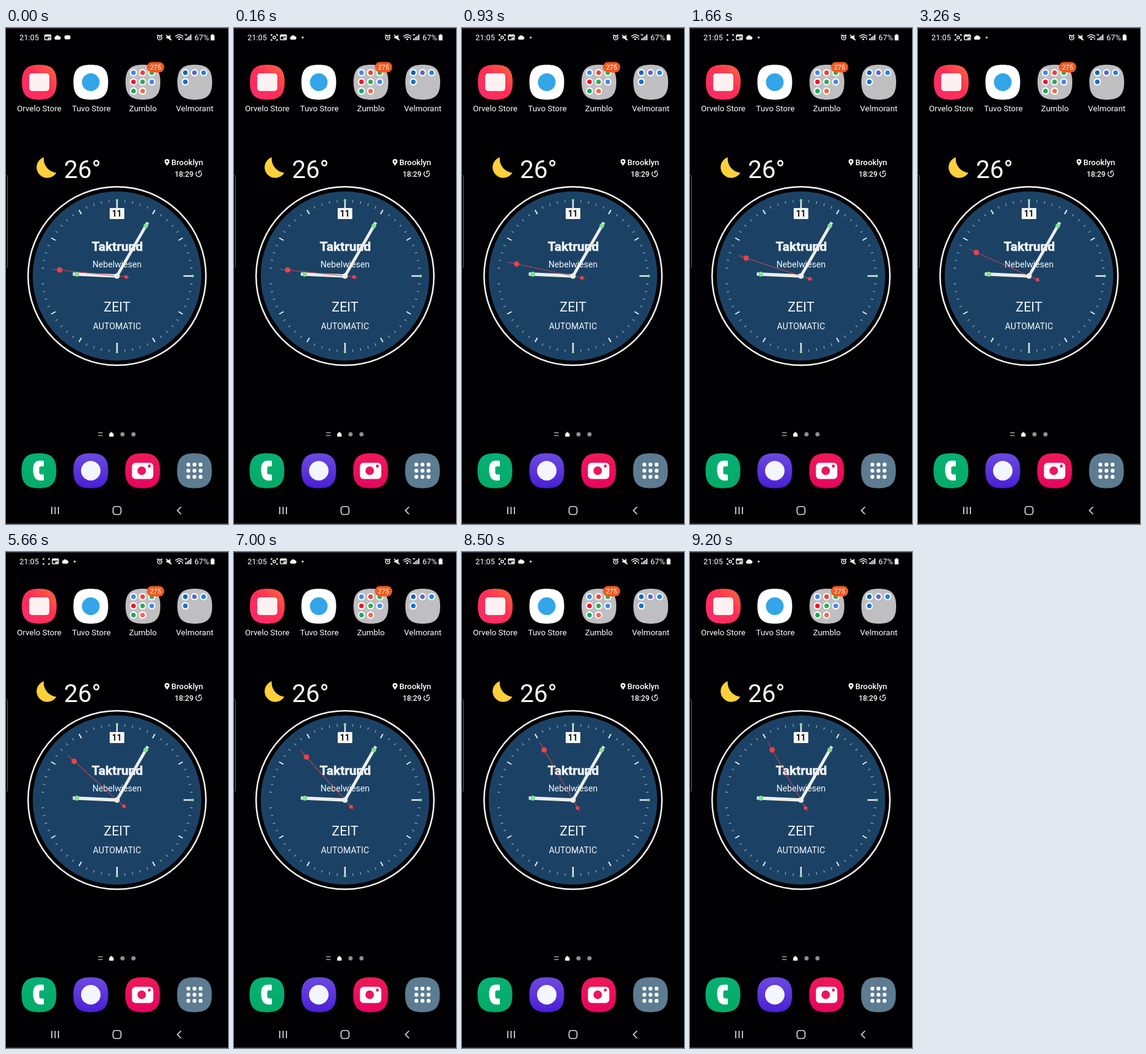
Animation of 364 by 810 pixels, one loop 9.23 s. Source, as an HTML page:

```html
<!DOCTYPE html>
<html lang="en">
<head>
<meta charset="utf-8">
<title>Clock home screen</title>
<style>
  html, body { margin: 0; width: 100%; height: 100%; overflow: hidden; background: #010103; }
  svg { display: block; width: 364px; height: 810px; font-family: Roboto, "Noto Sans", sans-serif; fill: #fff; }
  .mid { text-anchor: middle; }
  .label { font-size: 13.4px; text-anchor: middle; }
  .line { fill: none; stroke: #fff; stroke-width: 1.4; }
  .nav { fill: none; stroke: #dedede; stroke-width: 1.7; }
  .round { stroke-linecap: round; stroke-linejoin: round; }
</style>
</head>
<body>
<svg viewBox="0 0 364 810">
  <defs>
    <path id="tile" d="M28.5 0C49 0 57 8 57 28.5S49 57 28.5 57 0 49 0 28.5 8 0 28.5 0Z"/>
    <linearGradient id="shop" y1="1" x2="1" y2="0"><stop stop-color="#fb2a6c"/><stop offset=".55" stop-color="#ff2f55"/><stop offset="1" stop-color="#ff6a3c"/></linearGradient>
    <linearGradient id="web" x2="0" y2="1"><stop stop-color="#6c4ae0"/><stop offset="1" stop-color="#4a1fd6"/></linearGradient>
    <linearGradient id="call" x2="0" y2="1"><stop stop-color="#08b074"/><stop offset="1" stop-color="#02ab68"/></linearGradient>
    <linearGradient id="cam" x2="0" y2="1"><stop stop-color="#f01a58"/><stop offset="1" stop-color="#e5045f"/></linearGradient>
  </defs>
  <rect width="364" height="810" fill="#010103"/>
  <path d="M0 .5H364M0 809.5H364" stroke="#3c3c3e"/>
  <path d="M-2 240Q2.5 240 2.5 244V388Q2.5 392 -2 392" fill="#010103" stroke="#6a6a6c"/>

  <!-- status bar -->
  <text x="22" y="20" font-size="12.8">21:05</text>
  <g id="rec" class="line">
    <path d="M61 13V11H63M69 11H71V13M71 18V20H69M63 20H61V18"/>
    <rect id="core" x="64" y="13.5" width="4" height="4" rx="1"/>
  </g>
  <g id="icons">
    <rect x="76" y="11.2" width="10" height="8" rx="1" class="line"/>
    <path d="M76 12H86V14H76ZM81 15.5H85V18H81Z"/>
    <path d="M93.5 19A2.7 2.7 0 0 1 93.5 14 3.8 3.8 0 0 1 100 13.6 2.8 2.8 0 0 1 100.500 19Z"/>
  </g>
  <rect id="pill" x="96" y="12" width="9.5" height="6.5" rx="2"/>
  <circle id="more" cx="112.5" cy="15.5" r="1.6"/>

  <g class="line">
    <circle cx="252" cy="15.8" r="3.6"/>
    <path d="M247.5 12.5L249.5 11M256.5 12.5L254.5 11M252 13.8V16H253.5"/>
    <path d="M262.5 11L271.5 20"/>
    <path d="M278 13.5Q284 8.5 290 13.5M280 16Q284 12.5 288 16" class="round"/>
  </g>
  <path d="M263 14H265.5L269.5 11V20L265.5 17H263Z"/>
  <circle cx="284" cy="18.3" r="1.5"/>
  <path d="M288 17L289.5 15.5 291 17ZM288 18H291L289.5 19.5Z"/>
  <path d="M294 20V17H295.8V20ZM296.7 20V15H298.5V20ZM299.4 20V13H301.2V20ZM302.1 20V10.5H303.9V20ZM293 10.5H297V12H293Z"/>
  <text x="309" y="20" font-size="12.8">67%</text>
  <path d="M337.2 10.3H340.2V11.5H341.8V20.3H335.6V11.5H337.2Z"/>

  <!-- top row -->
  <use href="#tile" x="26" y="60" fill="url(#shop)"/>
  <rect x="38" y="74" width="33" height="29" rx="5" fill="#fff0f2"/>
  <use href="#tile" x="110.5" y="60"/>
  <circle cx="139" cy="88.5" r="14.5" fill="#34a5e8"/>
  <use href="#tile" x="196" y="60" fill="#bfbfc1"/>
  <use href="#tile" x="281" y="60" fill="#bfbfc1"/>
  <g id="minis"></g>
  <rect x="231" y="55.5" width="28.5" height="17" rx="8.5" fill="#f3581d"/>
  <text class="mid" x="245.2" y="68" font-size="11">275</text>
  <text class="label" x="54.5" y="136">Orvelo Store</text>
  <text class="label" x="140" y="136">Tuvo Store</text>
  <text class="label" x="224.5" y="136">Zumblo</text>
  <text class="label" x="309.5" y="136">Velmorant</text>

  <!-- weather -->
  <path d="M62 211A17.4 17.4 0 1 0 82.5 236.5A23 23 0 0 1 62 211Z" fill="#fdd03c"/>
  <text x="95" y="244.5" font-size="40.5">26°</text>
  <path fill-rule="evenodd" d="M264 225C261 221 260 219.5 260 218A4 4 0 0 1 268 218C268 219.5 267 221 264 225ZM264 216.5A1.5 1.5 0 1 0 264 219.5 1.5 1.5 0 1 0 264 216.5Z"/>
  <text x="271" y="224" font-size="13.3" font-weight="500">Brooklyn</text>
  <text x="276.5" y="243" font-size="12.2" font-weight="500">18:29</text>
  <path class="line" d="M313 234.8A4.5 4.5 0 1 0 319.8 236M316 233.8H320.5M316.3 233.5V238"/>

  <!-- watch face -->
  <circle cx="182" cy="405" r="145.8" fill="#010103" stroke="#f6f6f6" stroke-width="2.5"/>
  <circle cx="182" cy="405" r="138.2" fill="#1b4265"/>
  <g id="ticks" stroke="#e9eef2"></g>
  <g id="studs" fill="#7fdc92"></g>
  <rect x="170" y="294" width="24" height="18" rx="1" fill="#f6f8f6"/>
  <text class="mid" x="181.8" y="308" font-size="14" font-weight="700" fill="#111">11</text>
  <g class="mid" fill="#f4f7fa">
    <text x="182.5" y="364" font-size="21" font-weight="700" stroke="#f4f7fa" stroke-width=".5">Taktrund</text>
    <text x="182" y="390.5" font-size="14.1">Nebelwiesen</text>
    <text x="182" y="463" font-size="21.5">ZEIT</text>
    <text x="182" y="492" font-size="14.2">AUTOMATIC</text>
  </g>
  <g transform="translate(182 405)">
    <g transform="rotate(272.5)">
      <path d="M0 0V-72.5" stroke="#eceeec" stroke-width="5.5"/>
      <circle cy="-66" r="4" fill="#86dc95"/>
    </g>
    <g transform="rotate(30)">
      <path d="M0 0V-101" stroke="#eceeec" stroke-width="4.8"/>
      <circle cy="-94.5" r="3.8" fill="#86dc95"/>
    </g>
    <g id="second" fill="#ea424c">
      <path d="M0 21V-108.5" stroke="#d8434f"/>
      <circle cy="-94.5" r="4.5"/>
      <circle cy="15" r="3"/>
    </g>
    <circle r="4.5" fill="#eceeec"/>
  </g>

  <!-- page marks -->
  <path d="M151 661H158.5M151 665.5H158.5" stroke="#a5a5a7" stroke-width="1.6"/>
  <path d="M172.8 660L176 663V667H169.6V663Z" class="round" stroke="#fff" stroke-width=".8"/>
  <circle cx="191" cy="663.5" r="3.5" fill="#8d8d8f"/>
  <circle cx="209" cy="663.5" r="3.5" fill="#8d8d8f"/>

  <!-- dock -->
  <use href="#tile" x="25.5" y="694.5" fill="url(#call)"/>
  <path d="M56 706.5H60.5Q62 706.5 62 708V714.500Q62 716 60.500 716H57Q54.500 716 54.500 718.500V726Q54.500 729 57.500 729H60.500Q62 729 62 730.500V737.500Q62 739 60.500 739H57C48 739 44.500 732 44.500 721C44.500 711 48 706.500 56 706.500Z"/>
  <use href="#tile" x="110.5" y="694.5" fill="url(#web)"/>
  <circle cx="139" cy="723" r="16" fill="#f4f6ff"/>
  <use href="#tile" x="195.5" y="694.5" fill="url(#cam)"/>
  <rect x="206.500" y="710" width="35" height="26.5" rx="6"/>
  <circle cx="222.5" cy="723" r="7" fill="#e9175e"/>
  <circle cx="235" cy="715.5" r="2.4" fill="#e9175e"/>
  <use href="#tile" x="280.5" y="694.5" fill="#5d7b91"/>
  <g id="grid"></g>

  <!-- navigation -->
  <g class="nav">
    <path d="M75 782V794M80.5 782V794M86 782V794"/>
    <rect x="175.500" y="781.500" width="13" height="13" rx="4"/>
    <path d="M287 782L281 788 287 794"/>
  </g>
</svg>
<script>
const LOOP = 9230;
const el = id => document.getElementById(id);
const set = (id, name, value) => el(id).setAttribute(name, value);

function add(parent, tag, attrs) {
  const node = document.createElementNS("http://www.w3.org/2000/svg", tag);
  for (const key in attrs) node.setAttribute(key, attrs[key]);
  el(parent).appendChild(node);
}
const dot = (parent, cx, cy, r, fill) => add(parent, "circle", { cx, cy, r, ...(fill && { fill }) });

for (let i = 0; i < 60; i++) {
  if (i === 45) continue;
  const quarter = i % 15 === 0, hour = i % 5 === 0;
  const inner = quarter ? 109 : hour ? 116.5 : 120.5;
  add("ticks", "path", {
    d: `M182 ${405 - inner}V${405 - 124.5}`,
    transform: `rotate(${i * 6} 182 405)`,
    "stroke-width": quarter ? 2.4 : hour ? 2 : 1,
    opacity: hour ? 1 : 0.75
  });
}
[[182, 281.5], [306, 405], [182, 529]].forEach(([x, y]) => dot("studs", x, y, 2.2));

function fillFolder(x, colors) {
  colors.forEach((color, i) => {
    const cx = x + i % 3 * 15, cy = 73 + Math.floor(i / 3) * 15;
    dot("minis", cx, cy, 6, "#fff");
    dot("minis", cx, cy, 3.8, color);
  });
}
fillFolder(209, ["#4285f4", "#ea4335", "#34a853", "#f0142a", "#34a853", "#4285f4", "#18a85a", "#ee6a4d"]);
fillFolder(294, ["#0a66c2", "#5a63d8", "#1a82dc", "#0f72ce"]);

for (let i = 0; i < 9; i++) dot("grid", 299 + i % 3 * 10, 713 + Math.floor(i / 3) * 10, 3.2);

function draw() {
  const t = performance.now() % LOOP;

  // one hard tick per second, starting at 46 s
  const sec = 46 + Math.floor((t + 540) / 1000);
  set("second", "transform", `rotate(${sec * 6})`);

  // the status icon slides in, then blinks its core
  const p = Math.min(1, Math.max(0, (t - 30) / 110));
  const ease = 1 - (1 - p) * (1 - p);
  set("rec", "opacity", ease);
  set("icons", "transform", `translate(${-12.5 * (1 - ease)} 0)`);
  set("pill", "opacity", p > 0 ? 0 : 1);
  set("more", "opacity", ease);
  set("core", "opacity", (t + 70) % 1000 < 670 ? 1 : 0);

  requestAnimationFrame(draw);
}
draw();
</script>
</body>
</html>
```
